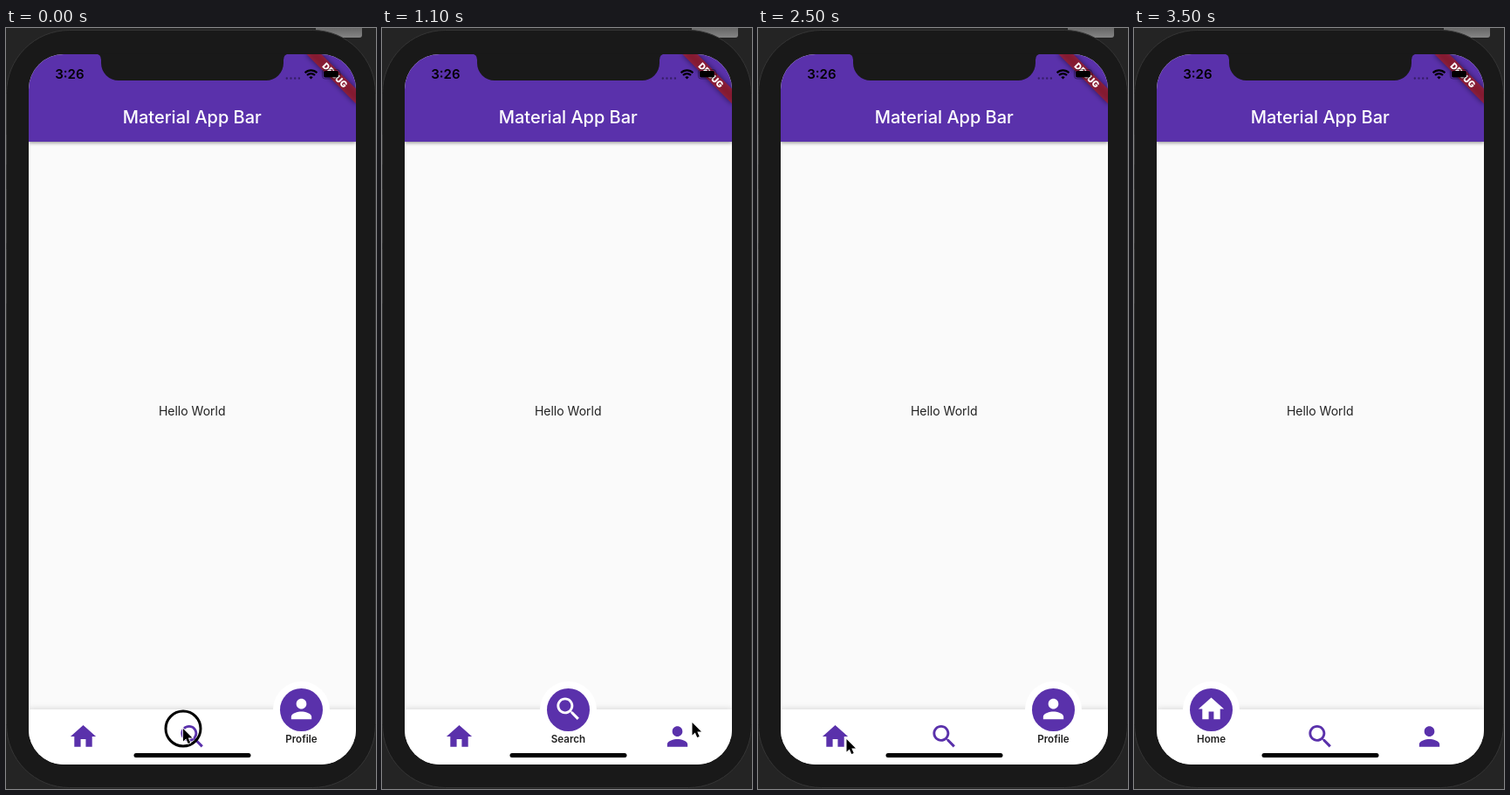
Recreate the animation shown at these times as an HTML page. Size 424 by 870 pixels, loop 4000 ms.

```html
<!DOCTYPE html>
<html lang="en">
<head>
<meta charset="utf-8">
<title>Bottom navigation</title>
<style>
  html, body { margin: 0; width: 100%; height: 100%; overflow: hidden; background: #242424; }
  svg { display: block; width: 424px; height: 870px; font-family: Inter, "Open Sans", sans-serif; }
  .mid { text-anchor: middle; }
  .appbar { fill: #5a31ab; filter: drop-shadow(0 1px 2px #0007); }
  .navbar { fill: #fff; filter: drop-shadow(0 -1px 3px #0002); }
  .label { font-size: 11.6px; font-weight: 600; fill: #212121; }
</style>
</head>
<body>
<svg viewBox="0 0 424 870">
  <defs>
    <clipPath id="screen"><rect x="26" y="30" width="375" height="812" rx="40"/></clipPath>
    <linearGradient id="metal" x2="0" y2="1">
      <stop stop-color="#5c5c5c"/><stop offset="1" stop-color="#858585"/>
    </linearGradient>
  </defs>

  <!-- Phone body -->
  <rect x="355" y="-4" width="53" height="15" rx="3" fill="url(#metal)"/>
  <rect x=".5" y="2.5" width="423" height="866" rx="72" fill="#191919" stroke="#353535"/>
  <path d="M.5 122v34M.5 184v62M.5 253v62" stroke="#3c3c3c"/>

  <g clip-path="url(#screen)">
    <path d="M26 30h375v812H26z" fill="#fafafa"/>
    <path class="appbar" d="M26 30h375v100H26z"/>
    <text class="mid" x="213.3" y="109" font-size="20" font-weight="500" fill="#fff">Material App Bar</text>
    <text class="mid" x="213.2" y="443" font-size="14" fill="#212121">Hello World</text>
    <path class="navbar" d="M26 779h375v63H26z"/>
    <g id="disc">
      <circle cy="779.5" r="32.5" fill="#fff"/>
      <circle cy="779.5" r="24.5" fill="#5a31ab"/>
    </g>
    <g id="tabs"></g>
    <rect x="146.5" y="829" width="134" height="5" rx="2.5"/>

    <!-- Debug ribbon -->
    <g transform="translate(401 30) rotate(45)">
      <path d="M-40 28h80v12h-80z" fill="#0008" style="filter: blur(3px)"/>
      <path d="M-40 28h80v12h-80z" fill="#b71c1c" fill-opacity=".63"/>
      <text class="mid" y="37.7" font-size="10.2" font-weight="900" fill="#fff">DEBUG</text>
    </g>

    <!-- Status bar -->
    <text x="56.3" y="58.3" font-size="15" font-weight="600">3:26</text>
    <path d="M321.8 57.5h16" stroke="#000" stroke-opacity=".4" stroke-width="2.4"
          stroke-linecap="round" stroke-dasharray="0 4.7"/>
    <path d="M342.6 51.3a9.8 9.8 0 0 1 13.8 0M345 54a6.4 6.4 0 0 1 9 0" fill="none" stroke="#000" stroke-width="2.2"/>
    <path d="M349.5 58.6l-2.2-2.3a3.1 3.1 0 0 1 4.4 0z"/>
    <rect x="362.5" y="47.5" width="20" height="10.5" rx="3" fill="none" stroke="#000" stroke-opacity=".4"/>
    <rect x="364" y="49" width="17" height="7.5" rx="1.8"/>
    <path d="M383.5 51v4q1.5-2 0-4" fill-opacity=".5"/>
  </g>
  <path d="M102 29.5q7 0 7 7V40a20 20 0 0 0 20 20h169a20 20 0 0 0 20-20v-3.5q0-7 7-7z" fill="#191919"/>

  <g id="cursor">
    <circle id="press" r="20" fill="none" stroke="#000" stroke-width="3"/>
    <path d="M0 0v14.5l3.3-3.1 2.4 5.6 2.5-1-2.4-5.5h4.7z" stroke="#fff" stroke-width="1.6" paint-order="stroke"/>
  </g>
</svg>
<script>
  const $ = id => document.getElementById(id);
  const LOOP = 4000, STEP = 100, SLIDE = 300, POWER = 1.7;
  const PURPLE = [90, 49, 171];

  const tabs = [
    ['Home', 'M10 20v-6h4v6h5v-8h3L12 3 2 12h3v8z'],
    ['Search', 'M15.5 14h-.79l-.28-.27C15.41 12.59 16 11.11 16 9.5 16 5.91 13.09 3 9.5 3S3 5.91 3 9.5 5.91 16 9.5 16c1.61 0 3.09-.59 4.23-1.57l.27.28v.79l5 4.99L20.49 19zm-6 0C7.01 14 5 11.99 5 9.5S7.01 5 9.5 5 14 7.01 14 9.5 11.99 14 9.5 14z'],
    ['Profile', 'M12 12c2.21 0 4-1.79 4-4s-1.79-4-4-4-4 1.79-4 4 1.79 4 4 4zm0 2c-2.67 0-8 1.34-8 4v2h16v-2c0-2.66-5.33-4-8-4z']
  ].map(([name, path], i) => {
    const x = tabX(i), g = document.createElementNS('http://www.w3.org/2000/svg', 'g');
    g.innerHTML = `<text class="label mid" x="${x}" y="817">${name}</text><path d="${path}"/>`;
    $('tabs').append(g);
    return { x, label: g.firstChild, icon: g.lastChild };
  });

  // Tab switches: start time, old tab, new tab
  const switches = [[275, 2, 1], [1609, 1, 2], [2778, 2, 0]];
  // Pointer path: time, x, y
  const moves = [
    [0, 203, 801], [700, 203, 801], [1100, 355.5, 794], [1400, 339.5, 805],
    [1900, 339.5, 805], [2400, 101.5, 813], [3100, 101.5, 813], [3400, 28, 23]
  ];
  const presses = [[0, 200], [1400, 1600], [2600, 2700]];

  function tabX(i) { return 88.5 + 125 * i; }
  const clamp = v => Math.min(1, Math.max(0, v));
  const mix = (a, b, k) => a + (b - a) * k;
  const easeIn = p => p ** POWER;
  const easeOut = p => 1 - easeIn(1 - p);

  function pointer(t) {
    let i = 0;
    while (i < moves.length - 2 && t >= moves[i + 1][0]) i++;
    const [t0, x0, y0] = moves[i], [t1, x1, y1] = moves[i + 1];
    const p = clamp((t - t0) / (t1 - t0)), k = p * p * (3 - 2 * p);
    return [mix(x0, x1, k), mix(y0, y1, k)];
  }

  function draw(t) {
    const [start, from, to] = switches.filter(s => s[0] <= t).pop() || switches[0];
    const p = clamp((t - start) / SLIDE), slide = easeOut(p);
    $('disc').setAttribute('transform', `translate(${mix(tabX(from), tabX(to), slide)})`);

    tabs.forEach(({ x, label, icon }, i) => {
      const on = i === to ? easeIn(p) : i === from ? 1 - slide : 0;
      label.style.opacity = on;
      icon.setAttribute('fill', `rgb(${PURPLE.map(c => Math.round(mix(c, 255, on)))})`);
      icon.setAttribute('transform', `translate(${x} ${mix(810, 778.5, on)}) scale(1.458) translate(-12 -12)`);
    });

    $('cursor').setAttribute('transform', `translate(${pointer(t)})`);
    $('cursor').style.display = t < 3500 ? '' : 'none';
    $('press').style.display = presses.some(([a, b]) => t >= a && t <= b) ? '' : 'none';
  }

  const origin = performance.now();
  function tick() {
    const t = (performance.now() - origin) % LOOP;
    draw(Math.floor(t / STEP) * STEP);
    requestAnimationFrame(tick);
  }
  tick();
</script>
</body>
</html>
```
